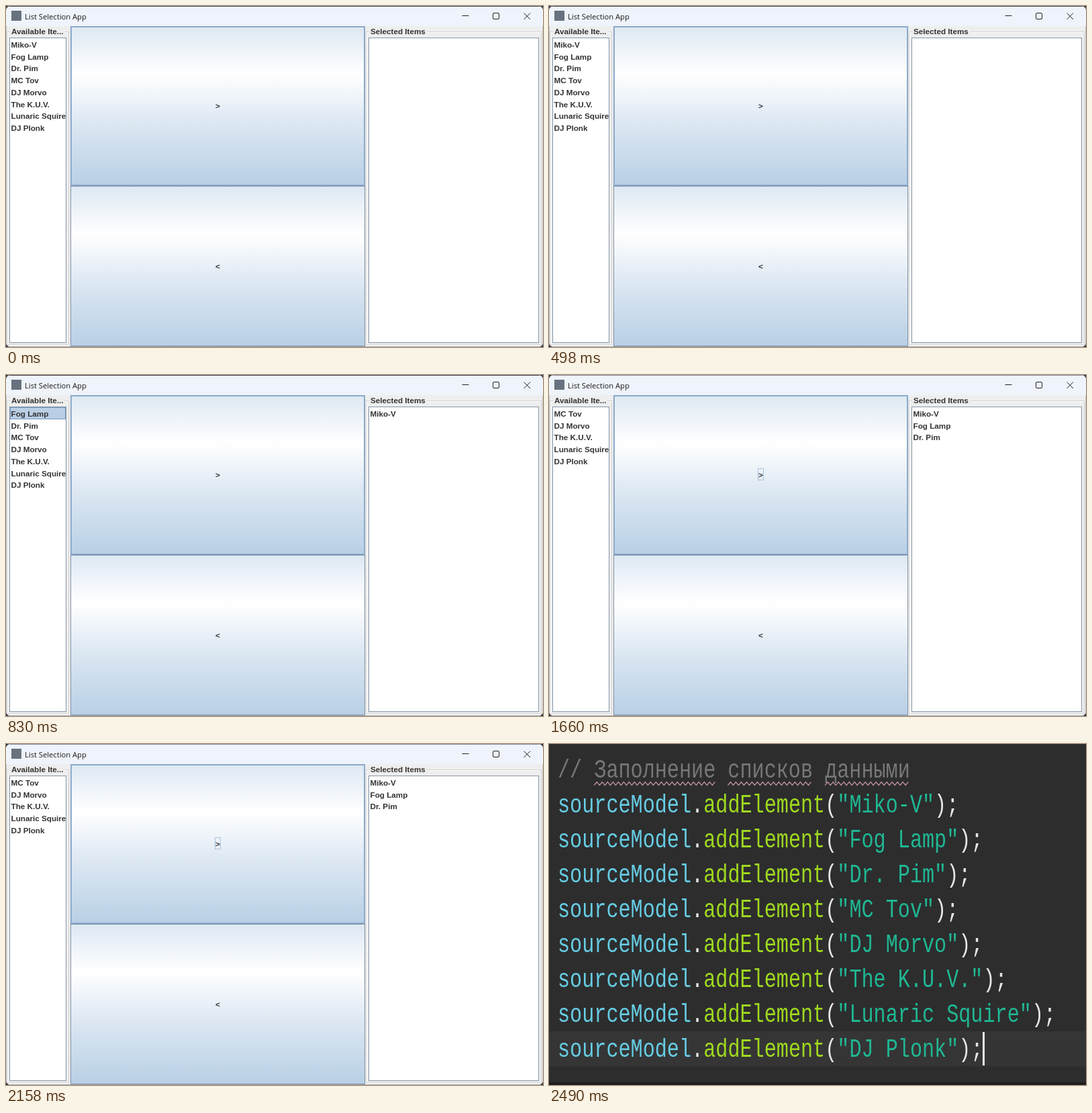
These frames come from a looping animation (800 px wide and 508 px high, 3.32 s). An HTML page with a canvas:

```html
<!DOCTYPE html>
<html>
<head>
<meta charset="utf-8">
<title>List Selection App</title>
<style>
html, body { margin: 0; width: 800px; height: 508px; overflow: hidden; background: #2d2d2f; }
canvas { display: block; }
</style>
</head>
<body>
<canvas id="stage" width="800" height="508"></canvas>
<script>
const ctx = document.getElementById('stage').getContext('2d');
const STEP = 830;
const names = ['Miko-V', 'Fog Lamp', 'Dr. Pim', 'MC Tov', 'DJ Morvo', 'The K.U.V.', 'Lunaric Squire', 'DJ Plonk'];
const BOLD = 'bold 11.7px "Liberation Sans", Arial, sans-serif';

function fill(x, y, w, h, color) {
  ctx.fillStyle = color;
  ctx.fillRect(x, y, w, h);
}

function outline(x, y, w, h, color) {
  ctx.lineWidth = 1;
  ctx.strokeStyle = color;
  ctx.strokeRect(x + 0.5, y + 0.5, w - 1, h - 1);
}

function line(points, color, width = 1) {
  ctx.lineWidth = width;
  ctx.strokeStyle = color;
  ctx.beginPath();
  points.forEach(([x, y]) => ctx.lineTo(x, y));
  ctx.stroke();
}

function text(str, x, y, font = BOLD, color = '#333') {
  ctx.font = font;
  ctx.fillStyle = color;
  ctx.fillText(str, x, y);
}

function titleBar() {
  fill(0, 0, 800, 30, '#eff3fb');
  fill(8, 7, 15, 15, '#68727e');
  text('List Selection App', 28, 20, '11.2px "Open Sans", sans-serif', '#1b1b1b');
  const ink = '#222';
  line([[679.5, 14.5], [689.5, 14.5]], ink);
  ctx.beginPath();
  ctx.roundRect(725.5, 10.5, 9, 9, 1.5);
  ctx.stroke();
  line([[771.5, 10.5], [781, 20]], ink);
  line([[781, 10.5], [771.5, 20]], ink);
}

function listPanel(x, right, title, items, selected) {
  outline(x + 1, 39, right - x - 1, 467, '#fff');
  outline(x, 38, right - x, 467, '#d2d2d2');
  ctx.font = BOLD;
  fill(x + 5, 34, ctx.measureText(title).width + 4, 12, '#eee');
  text(title, x + 7, 42.4);
  fill(x + 4, 47, right - x - 8, 455, '#fff');
  outline(x + 4, 47, right - x - 8, 455, '#8696a6');
  if (selected) {
    fill(x + 5, 48, right - x - 10, 18, '#b8cfe5');
    outline(x + 5, 48, right - x - 10, 18, '#7796bd');
  }
  items.forEach((item, i) => text(item, x + 6.5, 62 + i * 17.7));
}

function button(y, height, label, hovered, focused) {
  const shade = ctx.createLinearGradient(0, y, 0, y + height);
  shade.addColorStop(0, '#dde8f3');
  shade.addColorStop(0.3, '#fff');
  shade.addColorStop(0.6, '#dde8f3');
  shade.addColorStop(1, '#b8cfe5');
  fill(96, y, 439, height, shade);
  outline(96, y, 439, height, hovered ? '#87a3c2' : '#7f90a2');
  if (hovered) outline(97, y + 1, 437, height - 2, '#8fb0d1');
  const middle = y + height / 2;
  ctx.textAlign = 'center';
  text(label, 315.5, middle + 4);
  ctx.textAlign = 'left';
  if (focused) outline(311, Math.round(middle) - 10, 9, 18, '#a9c2dc');
}

function appWindow(moved, step) {
  fill(0, 0, 800, 508, '#343741');
  ctx.save();
  ctx.beginPath();
  ctx.roundRect(0, 0, 800, 508, 7);
  ctx.clip();
  fill(0, 0, 800, 508, '#eee');
  titleBar();
  listPanel(1, 94, 'Available Ite...', names.slice(moved), step === 1);
  listPanel(536, 798, 'Selected Items', names.slice(0, moved), false);
  button(30, 238, '>', true, step === 2);
  button(268, 239, '<', false, false);
  fill(0, 0, 800, 1, step === 2 ? '#858c9c' : '#3b404d');
  fill(0, 30, 1, 478, '#bfc3ca');
  fill(799, 30, 1, 478, '#bfc3ca');
  fill(0, 507, 800, 1, '#a3a8b0');
  ctx.restore();
}

// Code is set in a monospaced face inside a vertically enlarged view.
const CELL = 18.1, LEFT = 13;
const MONO = `${CELL / 0.6}px "Liberation Mono", "Courier New", monospace`;

function code(parts, baseline) {
  ctx.save();
  ctx.translate(LEFT, baseline);
  ctx.scale(1, 1.26);
  let column = 0;
  for (const [str, color] of parts) {
    text(str, column * CELL, 0, MONO, color);
    column += str.length;
  }
  ctx.restore();
  return LEFT + column * CELL;
}

function squiggle(from, to) {
  const points = [];
  for (let x = from, i = 0; x <= to; x += 4, i++) points.push([x, i % 2 ? 56.5 : 61.5]);
  line(points, '#bd8fa0', 1.3);
}

function editor() {
  fill(0, 0, 800, 508, '#2d2d2e');
  fill(0, 428, 800, 52, '#353536');
  fill(0, 504, 800, 4, '#211d20');
  const comment = '// Заполнение списков данными';
  code([[comment, '#777']], 50);
  for (const word of comment.matchAll(/[а-я]+/gi)) {
    const start = LEFT + word.index * CELL;
    squiggle(start, start + word[0].length * CELL);
  }
  let end;
  names.forEach((name, i) => {
    end = code([
      ['sourceModel', '#66cde3'], ['.', '#e6e6e6'], ['addElement', '#9fd91f'],
      ['(', '#e6e6e6'], [`"${name}"`, '#20b793'], [');', '#e6e6e6']
    ], 102 + i * 52);
  });
  fill(Math.round(end) - 1, 429, 3, 50, '#eee');
}

function draw(now) {
  const step = Math.floor(now / STEP) % 4;
  if (step === 3) editor();
  else appWindow([0, 1, 3][step], step);
}

const start = performance.now();
function tick() {
  draw(performance.now() - start);
  requestAnimationFrame(tick);
}
tick();
</script>
</body>
</html>
```
